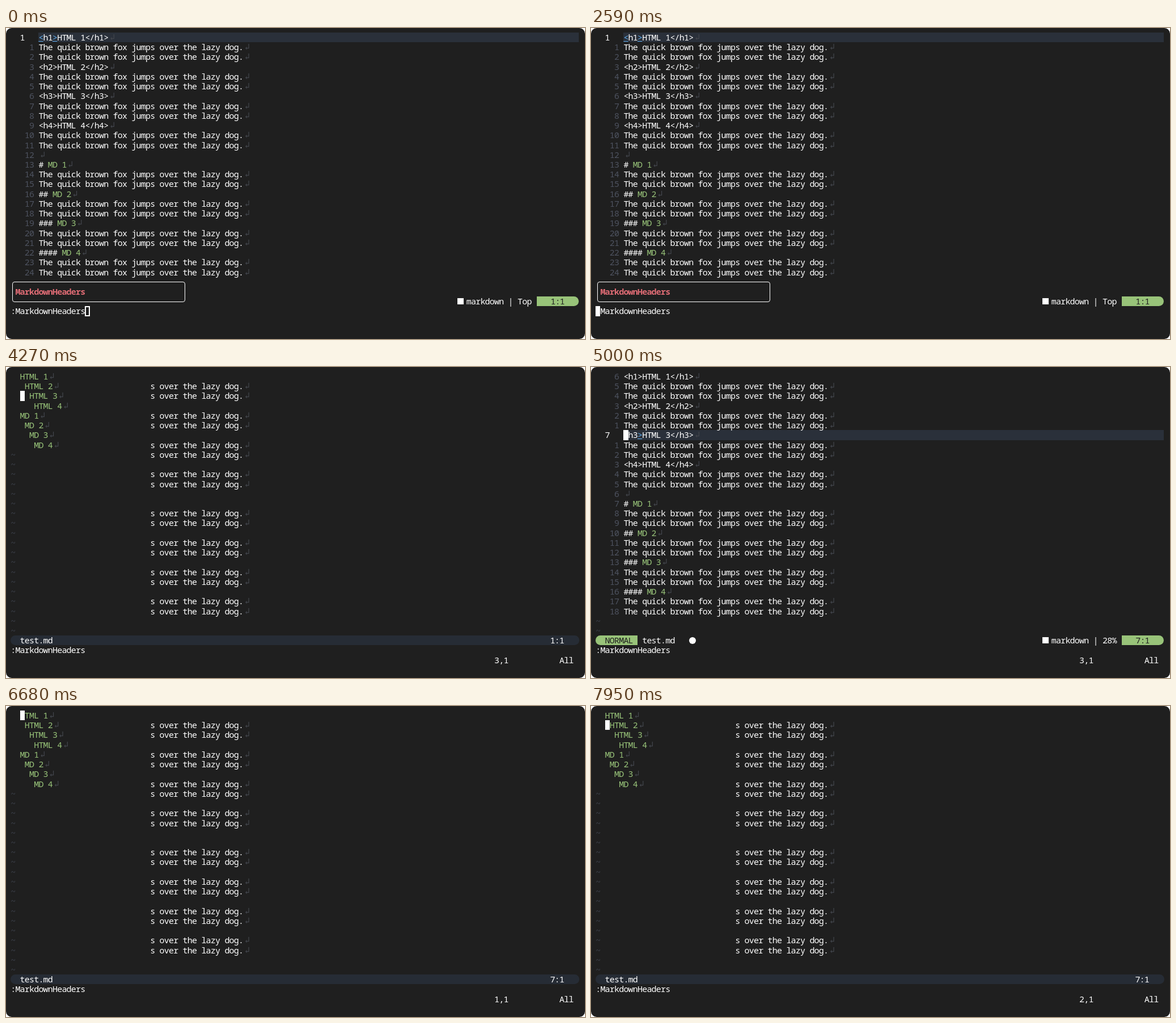
Write an HTML page that moves like this. It is 1021 px wide and 548 px high and loops after 8 s.

```html
<!DOCTYPE html>
<html lang="en">
<head>
<meta charset="utf-8">
<title>Markdown headers</title>
<style>
  html, body { margin: 0; width: 100%; height: 100%; overflow: hidden; background: #fff; }
  #term {
    --cw: 8.2px; --lh: 17.23px;
    position: relative; width: 1021px; height: 548px; overflow: hidden;
    border-radius: 10px; background: #1f1f1f; color: #fff;
    font: 15px/17.23px "Noto Sans Mono", "DejaVu Sans Mono", monospace;
    letter-spacing: calc(var(--cw) - .6em);
    font-variant-ligatures: none;
  }
  #term span {
    position: absolute; white-space: pre; box-sizing: border-box; height: var(--lh);
    left: calc(var(--cw) * (var(--col) + 1));
    top: calc(8px + var(--lh) * var(--row));
    width: calc(var(--cw) * var(--len));
  }
  .green { color: #98c379; }
  .num { color: #4e5360; }
  .tilde { color: #3d414b; }
  #term .eol { color: #43464d; font-family: "DejaVu Sans Mono", monospace; margin-left: 2.5px; }
  .match { color: #61afef; text-decoration: underline; }
  .line { background: #2a303a; }
  .bar { background: #262c35; border-radius: 9px; }
  .pill { background: #98c379; color: #1f1f1f; }
  .left { border-radius: 9px 0 0 9px; }
  .right { border-radius: 0 9px 9px 0; }
  .cursor { background: #fff; }
  .hollow { border: 2px solid #fff; }
  #term .dot { width: 12px; height: 12px; margin: 2.6px 0 0 1px; border-radius: 50%; background: #fff; }
  #term .tile { width: 11px; height: 11px; margin: 3px 0 0 1px; background: #fff; }
  #term .popup {
    left: 11px; top: 447px; width: 305px; height: 36px;
    border: 1px solid #fff; border-radius: 4px;
  }
  .choice { color: #e06c75; font-weight: bold; }
</style>
</head>
<body>
<div id="term"></div>
<script>
const term = document.getElementById('term');
const SENTENCE = 'The quick brown fox jumps over the lazy dog.';
const COMMAND = ':MarkdownHeaders';
const LOOP = 8000, ROWS = 27, STATUS = 27, CMD = 28, RULER = 29, TEXT = 6;

const levels = [1, 2, 3, 4];
const html = levels.flatMap(n => [`<h${n}>HTML ${n}</h${n}>`, SENTENCE, SENTENCE]);
const md = levels.flatMap(n => ['#'.repeat(n) + ` MD ${n}`, SENTENCE, SENTENCE]);
const lines = [...html, '', ...md];

function put(row, col, text, cls = '', len = text.length) {
  const cell = document.createElement('span');
  cell.className = cls;
  cell.textContent = text;
  for (const [key, value] of Object.entries({ row, col, len })) cell.style.setProperty('--' + key, value);
  term.append(cell);
}

const eol = (row, col) => put(row, col, '↲', 'eol');
const cursor = (row, col, cls = 'cursor') => put(row, col, '', cls, 1);

function tildes(from) {
  for (let row = from; row < ROWS; row++) put(row, 0, '~', 'tilde');
}

function ruler(line, all = true) {
  put(RULER, 104, line + ',1');
  if (all) put(RULER, 118, 'All');
}

function editor(current) {
  put(current, TEXT, '', 'line', 116.2);
  lines.forEach((text, row) => {
    const offset = Math.abs(row - current);
    if (offset) put(row, 3, String(offset).padStart(2), 'num');
    else put(row, 2, String(row + 1));

    const hashes = text.startsWith('#') ? text.indexOf(' ') + 1 : 0;
    if (hashes) {
      put(row, TEXT, text.slice(0, hashes));
      put(row, TEXT + hashes, text.slice(hashes), 'green');
    } else if (!offset) {
      put(row, TEXT, '<', 'match');
      put(row, TEXT + 1, text.slice(1, 3));
      put(row, TEXT + 3, '>', 'match');
      put(row, TEXT + 4, text.slice(4));
    } else {
      put(row, TEXT, text);
    }
    eol(row, TEXT + text.length);
  });

  put(STATUS, 96, '', 'tile');
  put(STATUS, 98, 'markdown | ' + (current ? '28%' : 'Top'));
  put(STATUS, 113.1, `   ${current + 1}:1   `, 'pill right', 9.1);
  put(CMD, 0, COMMAND);
}

// The completion popup takes the place of the tildes and the left status.
function prompt(current, col, cls) {
  editor(current);
  put(0, 0, '', 'popup');
  put(26, 1, 'MarkdownHeaders', 'choice');
  cursor(CMD, col, cls);
}

function normal() {
  editor(6);
  tildes(lines.length);
  put(STATUS, 0, '  NORMAL ', 'pill left');
  put(STATUS, 10, 'test.md');
  put(STATUS, 20, '', 'dot');
  cursor(6, TEXT);
  ruler(3);
}

function list(from, selected, all) {
  lines.forEach((text, row) => {
    if (text !== SENTENCE) return;
    put(row, 30, text.slice(24));
    eol(row, TEXT + text.length);
  });
  ['HTML', 'MD'].forEach((kind, group) => levels.forEach(n => {
    const row = group * 4 + n - 1, title = `${kind} ${n}`;
    put(row, n + 1, title, 'green');
    eol(row, n + 1 + title.length);
  }));
  tildes(8);
  put(STATUS, 0, '', 'bar', 122.3);
  put(STATUS, 2, 'test.md');
  put(STATUS, 116, from + ':1');
  put(CMD, 0, COMMAND);
  cursor(selected - 1, 2);
  ruler(selected, all);
}

const timeline = [
  [0, () => prompt(0, 16, 'hollow')],
  [200, () => prompt(0, 16)],
  [900, () => prompt(0, 0)],
  [2720, () => list(1, 1, false)],
  [3600, () => list(1, 2)],
  [3850, () => list(1, 3)],
  [4450, normal],
  [6300, () => prompt(6, 16)],
  [6500, () => prompt(6, 0)],
  [6660, () => list(7, 1)],
  [7500, () => list(7, 2)],
];

const start = performance.now();
let shown = null;

function frame(now) {
  const time = Math.max(0, now - start) % LOOP;
  const scene = timeline.findLast(([from]) => from <= time);
  if (scene !== shown) {
    shown = scene;
    term.replaceChildren();
    scene[1]();
  }
  requestAnimationFrame(frame);
}
frame(start);
</script>
</body>
</html>
```
